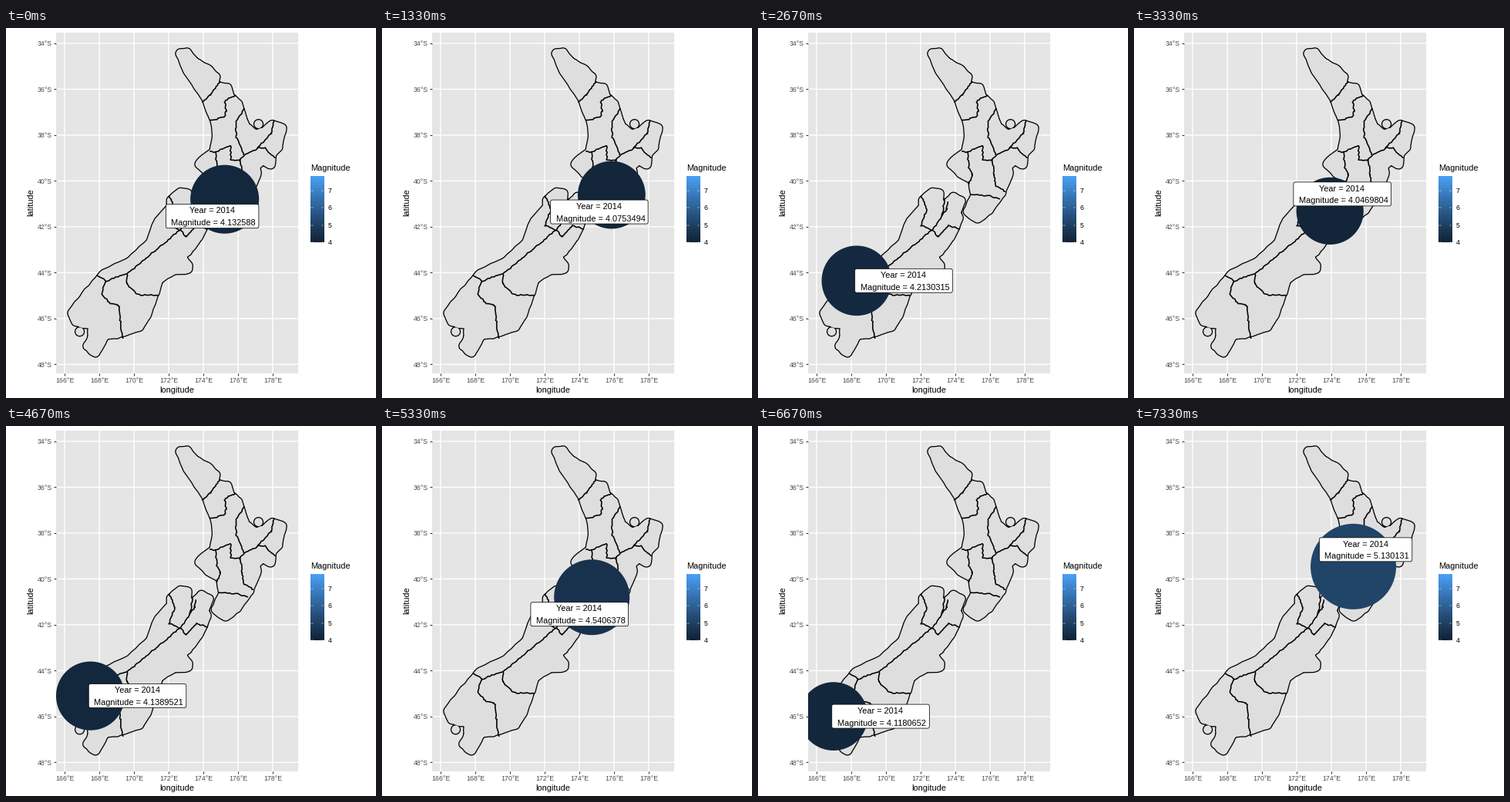
Recreate the animation shown at these times as a matplotlib script. Size 480x480 px, loop 8 s.

```python
import numpy as np
import matplotlib.pyplot as plt
from matplotlib.animation import FuncAnimation
from matplotlib.patches import Circle, FancyBboxPatch, Polygon, Rectangle

plt.rcParams["font.family"] = "Liberation Sans"
DPI, SIZE = 80, 480
PT = 72 / DPI                      # points per pixel
LEFT, TOP, RIGHT, BOTTOM = 65, 5.5, 379, 448
LOOP, FRAMES = 8000, 200
SEA = 6                            # width of the sea belt in pixels
LAND = "#dedede"
LOW, HIGH = np.array([18, 36, 56]) / 255, np.array([74, 160, 245]) / 255

rng = np.random.default_rng(4)
fig = plt.figure(figsize=(SIZE / DPI, SIZE / DPI), dpi=DPI, facecolor="white")
ax = fig.add_axes([0, 0, 1, 1])
ax.axis("off")


def project(lon, lat):
    return 76 + 22.5 * (lon - 166), 19.9 + 29.75 * (lat - 34)


def text(x, y, s, size=11, color="black", ha="left", va="baseline", **kw):
    return ax.text(x, y, s, fontsize=size * PT, color=color, ha=ha, va=va, **kw)


def line(xs, ys, color, width, z, **kw):
    ax.plot(xs, ys, color=color, lw=width * PT, zorder=z,
            solid_capstyle="butt", solid_joinstyle="round", **kw)


def shade(mag):
    t = np.clip((mag - 4) / 3.85, 0, 1) ** 1.1
    return LOW + (HIGH - LOW) * t


def ragged(points, step, amount):
    """Jittered pixel path through lon/lat points."""
    p = np.array([project(*q) for q in points])
    s = np.r_[0, np.cumsum(np.hypot(*np.diff(p, axis=0).T))]
    u = np.union1d(s, np.arange(0, s[-1], step))
    path = np.c_[np.interp(u, s, p[:, 0]), np.interp(u, s, p[:, 1])]
    path[1:-1] += rng.uniform(-amount, amount, path[1:-1].shape)
    return path


def island(coast, *islets):
    """Land grown by the sea belt: a black shape under a slightly thinner one."""
    shape = ragged(coast + coast[:1], 7, 0.7)
    for color, grow, z in (("black", SEA + 0.65, 2), (LAND, SEA - 0.65, 2.1)):
        ax.add_patch(Polygon(shape, fc=color, ec=color, lw=2 * grow * PT,
                             joinstyle="round", zorder=z))
        for spot in islets:
            ax.add_patch(Circle(project(*spot), grow, fc=color, lw=0, zorder=z))


# Panel, grid and axes
panel = Rectangle((LEFT, TOP), RIGHT - LEFT, BOTTOM - TOP, fc="#e5e5e5", lw=0)
ax.add_patch(panel)
for lon in range(166, 179, 2):
    x, _ = project(lon, 34)
    line([x, x], [TOP, BOTTOM], "white", 1.4, 1, snap=False)
    line([x, x], [BOTTOM, BOTTOM + 3], "#333333", 1.07, 1)
    text(x, 460, f"{lon}°E", 8.8, "#4d4d4d", "center")
for lat in range(34, 49, 2):
    _, y = project(166, lat)
    line([LEFT, RIGHT], [y, y], "white", 1.4, 1, snap=False)
    line([LEFT - 3, LEFT], [y, y], "#333333", 1.07, 1)
    text(60, y + 3.2, f"{lat}°S", 8.8, "#4d4d4d", "right")
text(222, 473, "longitude", ha="center")
text(32.5, 226, "latitude", ha="center", va="center", rotation=90)

# Islands as key points of the coast: longitude east, latitude south
island([(172.68, 34.43), (173.03, 34.42), (173.45, 34.8), (174.33, 35.17),
        (174.7, 35.48), (174.6, 35.8), (175.1, 35.92), (175.38, 35.93),
        (175.53, 36.35), (175.95, 36.6), (176.1, 36.97), (176.4, 37.63),
        (177, 37.95), (177.5, 37.88), (177.98, 37.54), (178.55, 37.69),
        (178.3, 38.53), (177.97, 38.77), (177.87, 39.28), (177.4, 39.07),
        (177, 39.35), (177.09, 39.64), (176.63, 40.5), (175.95, 41.25),
        (175.28, 41.62), (174.7, 41.35), (175.15, 40.6), (174.98, 39.95),
        (174.2, 39.6), (173.75, 39.28), (174.05, 39.05), (174.6, 38.75),
        (174.75, 38.1), (174.7, 37.4), (174.15, 36.4), (173.1, 35.18)],
       (177.18, 37.52), (176.25, 37.28))
island([(172.68, 40.5), (173.05, 40.55), (173.05, 40.9), (173.2, 41.2),
        (173.9, 40.7), (174.3, 40.85), (174.05, 41.4), (174.2, 41.65),
        (173.7, 42.42), (173.1, 43.05), (172.72, 43.3), (173.1, 43.65),
        (173.1, 43.85), (172.3, 43.88), (171.4, 44.3), (171.15, 44.95),
        (170.75, 45.85), (170.3, 46.34), (169.82, 46.45), (169, 46.68),
        (168.4, 46.7), (168.15, 46.98), (167.78, 47.5), (167.35, 47.18),
        (167.6, 46.8), (167.6, 46.28), (166.65, 46.15), (166.45, 45.75),
        (167.2, 45), (168.3, 44.05), (169.7, 43.55), (170.9, 42.75),
        (171.4, 41.75), (172.1, 41.2), (172.15, 40.85)],
       (166.87, 46.57))

# Region borders, several of them meeting at shared points
hub, lake, pass_, alps = (176.36, 38.88), (174.71, 38.74), (172.67, 42.14), (169.6, 44.05)
fjord, bay = (168.4, 44.36), (173.24, 41.5)
for border in (
        [(173.91, 36.56), (174.44, 36.25), (174.93, 35.68)],
        [(175.87, 36.26), (175.24, 36.5), (175.33, 36.96), (175.2, 37.2), (174.4, 37.37)],
        [(176.36, 36.83), (175.87, 37.43), (175.91, 38.1), hub],
        [hub, (177.07, 38.61), (177.91, 37.94), (178.09, 37.36)],
        [(177.11, 38.57), (177.5, 38.54), (178.13, 39.01)],
        [(174.36, 38.71), lake, (175.56, 38.47), (175.6, 39.08), (176.09, 39.08), hub],
        [lake, (174.76, 39.38), (174.98, 39.72), (174.76, 40.15)],
        [(176.13, 39.05), (176.22, 39.72), (176.36, 40.22), (176.89, 40.46)],
        [(174.84, 40.59), (175.96, 40.66), (176.58, 40.79)],
        [(172.04, 40.63), (172.36, 41.23), (172.04, 41.94), pass_],
        [(173.38, 40.76), bay, pass_],
        [(173.56, 40.9), (173.51, 41.23), bay],
        [pass_, (172.98, 42.44), (173.64, 41.94), (174.27, 42.1)],
        [pass_, (171.38, 42.94), alps],
        [(167.87, 44.12), fjord, alps],
        [fjord, (168.13, 44.89), (168.53, 45.3), (169.11, 45.43), (169.33, 46.84)],
        [alps, (169.6, 44.49), (170.18, 44.96), (171.42, 45)]):
    line(*ragged(border, 2.5, 0.9).T, "black", 1.6, 3)

# Legend
text(395, 185, "Magnitude")
ramp = np.array([shade(m) for m in np.linspace(7.85, 4, 86)])[:, None, :]
ax.imshow(ramp, extent=(395, 412.3, 278, 192), aspect="auto", zorder=2)
for m in range(4, 8):
    y = 277.7 - 22.2 * (m - 4)
    for x in (395, 408.8):
        line([x, x + 3.5], [y, y], "white", 0.4, 3)
    text(418, y + 3.2, str(m), 8.8)
ax.set_xlim(0, SIZE)
ax.set_ylim(SIZE, 0)

# Quakes: longitude, latitude, magnitude, side the label leans to
quakes = [
    (175.23, 40.80, 4.132588, -1), (175.33, 41.12, 4.0912576, 1),
    (175.86, 40.61, 4.0753494, -1), (177.78, 38.20, 4.1075214, -1),
    (168.31, 44.35, 4.2130315, 1), (173.92, 41.31, 4.0469804, 1),
    (172.68, 43.57, 4.1247813, 1), (167.49, 45.10, 4.1389521, 1),
    (174.72, 40.80, 4.5406378, -1), (176.36, 37.87, 4.0418039, 1),
    (166.98, 45.99, 4.1180652, 1), (175.27, 39.46, 5.130131, 1)]

dot = ax.add_patch(Circle((0, 0), 44, lw=0, zorder=5))
dot.set_clip_path(panel)
box = ax.add_patch(FancyBboxPatch((0, 0), 1, 1, fc="white", ec="black",
                                  lw=0.75 * PT, zorder=6,
                                  boxstyle="round,pad=0,rounding_size=2.3"))
year = text(0, 0, "Year = 2014", ha="center", zorder=7)
value = text(0, 0, "", ha="center", zorder=7)


def draw(i):
    lon, lat, mag, side = quakes[((i + 1) * len(quakes) - 1) // FRAMES]
    x, y = project(lon, lat)
    dot.center = x, y
    dot.set_radius(44.5 + 11 * (mag - 4.13))
    dot.set_facecolor(shade(mag))

    # The label leans off the dot and stays clear of the panel edges
    w, h = 71.5 + 6.12 * len(str(mag)), 31
    dx, dy = (61, 0) if x < LEFT + 80 else (16 * side, -22 * side)
    lx, ly = min(x + dx, RIGHT - 5 - w / 2), y + dy
    box.set_bounds(lx - w / 2, ly - h / 2, w, h)
    year.set_position((lx - 0.5, ly - 3.7))
    value.set_position((lx + 1.6, ly + 12))
    value.set_text(f"Magnitude = {mag}")
    return dot, box, year, value


anim = FuncAnimation(fig, draw, frames=FRAMES, interval=LOOP // FRAMES,
                     repeat=True, repeat_delay=0)
plt.show()
```
